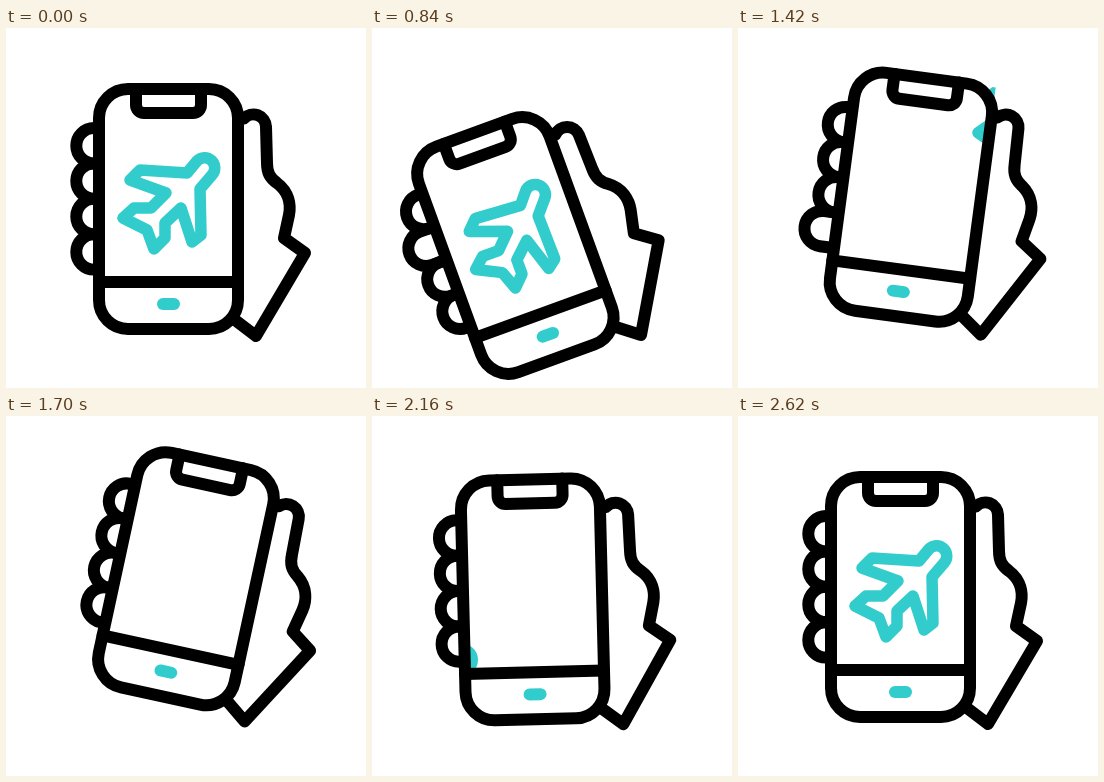
Animation, 360 px wide and 360 px high, one loop 2820 ms. Source, as an HTML page with a canvas:

```html
<!DOCTYPE html>
<html lang="en">
<head>
<meta charset="utf-8">
<title>Phone in hand</title>
<style>
html, body { margin: 0; width: 100%; height: 100%; overflow: hidden; background: #fff; }
canvas { display: block; width: 100vw; height: 100vh; object-fit: contain; }
</style>
</head>
<body>
<canvas id="stage" width="360" height="360"></canvas>
<script>
const ctx = document.getElementById('stage').getContext('2d');
const LOOP = 2820;
const BLACK = '#000';
const TEAL = '#33cccc';
const PIVOT = [256.5, 253.5];

// [time, value] keys, joined with sine easing
const TILT = [[0, 0], [600, -20], [1000, -20], [1605, 15], [2020, -7], [2300, 4], [2600, 0]];
const FLY_OUT = [[1000, 0], [1600, 130]];
const FLY_IN = [[2000, -130], [2600, 0]];

const hand = new Path2D('M238 90.5A12.7 12.7 0 0 1 260 98.7L261 135C261 145 264 150 271 155' +
  'C283 164 285 177 283 187L278 210L299 225L250 308L229 292');
const body = new Path2D('M122 61H203A29 29 0 0 1 232 90V272A29 29 0 0 1 203 301H122' +
  'A29 29 0 0 1 93 272V90A29 29 0 0 1 122 61Z');
const trim = new Path2D('M93 254H232M130 61V77A8 8 0 0 0 138 85H187A8 8 0 0 0 195 77V61');
const home = new Path2D('M157 276H168');
const finger = new Path2D('M106 -17.7H88A17.7 17.7 0 0 0 88 17.7H106');
const plane = new Path2D('M191 133A10 10 0 0 1 206 147L194 161L195 207L186 214L175 180L159 195' +
  'L159 210L148 221L141 202L117 190L128 180L145 180L160 165L124 152L134 142L181 145Z');

function ease(keys, t) {
  if (t <= keys[0][0]) return keys[0][1];
  for (let i = 1; i < keys.length; i++) {
    const [t0, a] = keys[i - 1], [t1, b] = keys[i];
    if (t < t1) return a + (b - a) * (1 - Math.cos(Math.PI * (t - t0) / (t1 - t0))) / 2;
  }
  return keys[keys.length - 1][1];
}

// how far finger i lifts off the phone
function lift(i, t) {
  const d = (t - 480 - 280 * i) / 300;
  return Math.abs(d) < 1 ? 6.25 * (1 + Math.cos(Math.PI * d)) : 0;
}

function stroke(path, color, width) {
  ctx.strokeStyle = color;
  ctx.lineWidth = width;
  ctx.stroke(path);
}

function draw(t) {
  ctx.setTransform(1, 0, 0, 1, 0, 0);
  ctx.fillStyle = '#fff';
  ctx.fillRect(0, 0, 360, 360);
  ctx.lineCap = ctx.lineJoin = 'round';

  ctx.translate(...PIVOT);
  ctx.rotate(ease(TILT, t) * Math.PI / 180);
  ctx.translate(-PIVOT[0], -PIVOT[1]);

  stroke(hand, BLACK, 12);
  for (let i = 0; i < 4; i++) {
    ctx.save();
    ctx.translate(-lift(i, t), 117.7 + 35.4 * i);
    stroke(finger, BLACK, 12);
    ctx.restore();
  }
  ctx.fill(body);

  const leaving = t < 1800;
  const shift = ease(leaving ? FLY_OUT : FLY_IN, t);
  ctx.save();
  ctx.beginPath();
  ctx.rect(93, 61, 139, 193);
  ctx.clip();
  ctx.translate(shift, shift * (leaving ? -0.79 : -0.92));
  stroke(plane, TEAL, 11.5);
  ctx.restore();

  stroke(trim, BLACK, 12);
  stroke(body, BLACK, 12);
  stroke(home, TEAL, 12);
}

const start = performance.now();
function tick() {
  draw((performance.now() - start) % LOOP);
  requestAnimationFrame(tick);
}
tick();
</script>
</body>
</html>
```
